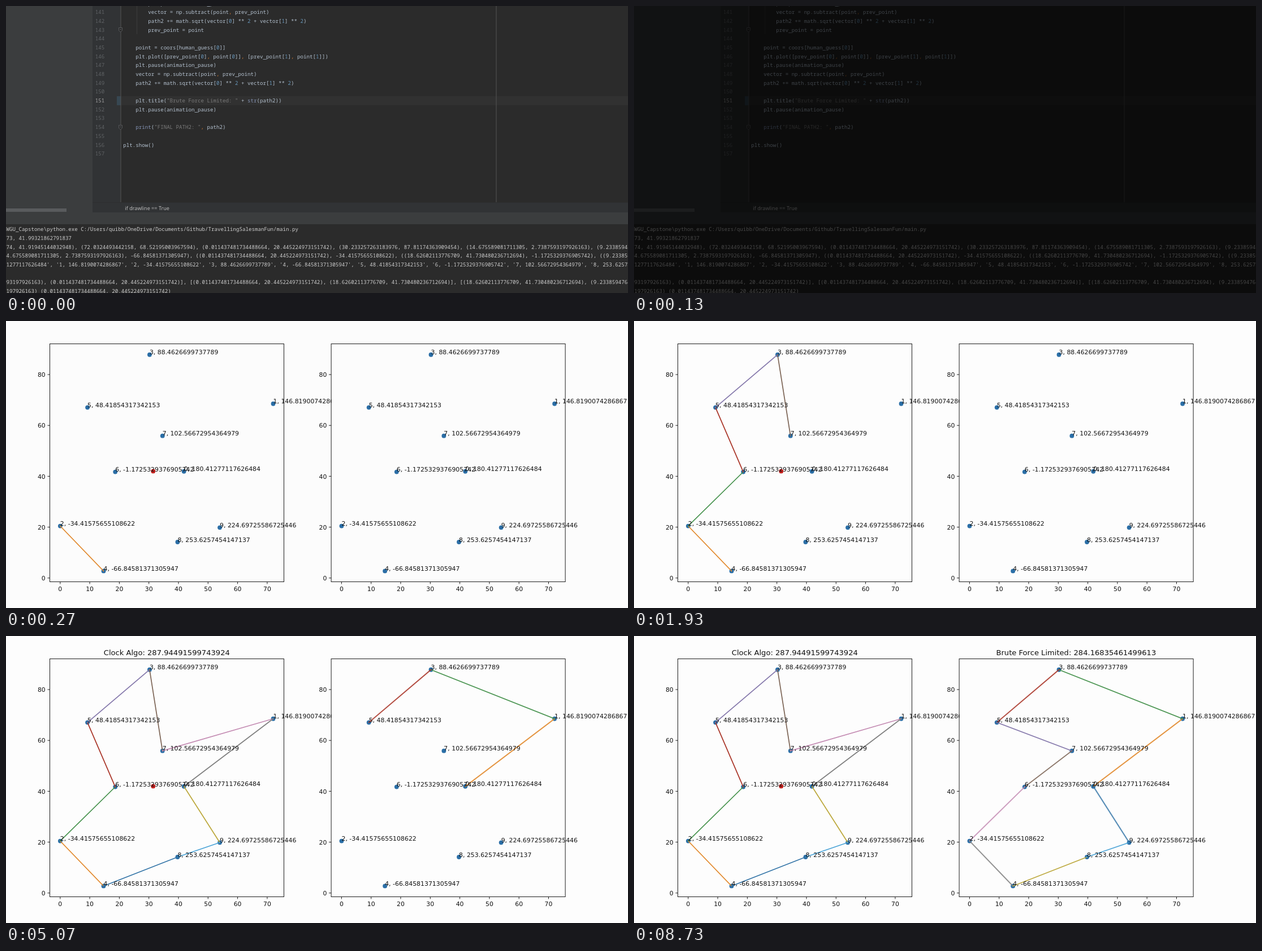
Recreate the animation shown at these times as an HTML page. Size 1100 by 509 pixels, loop 8790 ms.

```html
<!DOCTYPE html>
<html lang="en">
<head>
<meta charset="utf-8">
<title>Travelling salesman plots</title>
<style>
  html, body { margin: 0; width: 100%; height: 100%; overflow: hidden; background: #000; }
  svg { position: absolute; left: 0; top: 0; width: 1100px; height: 509px; overflow: hidden; }
  text { white-space: pre; }
  #editor text { font: 9.167px "Noto Sans Mono", "DejaVu Sans Mono", monospace; fill: #b3c0ce; }
  #editor .crumb { font: 9.1px "Open Sans", "Noto Sans", sans-serif; fill: #c4c4c4; }
  #editor .out { fill: #cdcdcd; }
  #editor .no { fill: #606366; }
  #editor .now { fill: #a4a3a3; }
  .num { fill: #6897bb; }
  .str { fill: #7a7a7a; }
  .fn { fill: #8493b4; }
  .sep { fill: #cc7832; }
  #plots text { font: 10.92px "DejaVu Sans", sans-serif; fill: #111; }
  #plots .title { font-size: 13.1px; }
  .mid { text-anchor: middle; }
  .end { text-anchor: end; }
</style>
</head>
<body>
<svg id="editor" viewBox="0 0 1100 509"></svg>
<svg id="plots" viewBox="0 0 1100 509"></svg>
<script>
const LOOP = 8790, STEP = 400;
const editor = document.getElementById('editor');
const plots = document.getElementById('plots');

// x, y and clock angle around the center; both screens are built from these
const center = [31.44573, 41.99321862791837];
const cities = [
  [41.852074, 41.91945144032948, 180.41277117626484],
  [72.0324493442158, 68.52195003967594, 146.8190074286867],
  [0.011437481734488664, 20.445224973151742, -34.41575655108622],
  [30.233257263183976, 87.81174363909454, 88.4626699737789],
  [14.675589081711305, 2.7387593197926163, -66.84581371305947],
  [9.233859476, 67.06, 48.41854317342153],
  [18.62602113776709, 41.730480236712694, -1.1725329376905742],
  [34.6, 55.9, 102.56672954364979],
  [39.7, 14.15, 253.6257454147137],
  [53.97, 19.85, 224.69725586725446]
].map(([x, y, angle], id) => ({ id, x, y, angle }));
const byAngle = [...cities].sort((a, b) => a.angle - b.angle);
const shortest = [...'0135762489'].map(id => cities[id]);

function add(parent, tag, attrs, content) {
  const el = document.createElementNS('http://www.w3.org/2000/svg', tag);
  for (const k in attrs) el.setAttribute(k, attrs[k]);
  if (content !== undefined) el.textContent = content;
  parent.appendChild(el);
  return el;
}
const rect = (p, x, y, width, height, fill) => add(p, 'rect', { x, y, width, height, fill });
const line = (p, x1, y1, x2, y2, stroke, w = 1) =>
  add(p, 'line', { x1, y1, x2, y2, stroke, 'stroke-width': w });
const label = (p, x, y, s, cls = '') => add(p, 'text', { x, y, class: cls }, s);

// rows: [time, style]; every value holds until the next row
function hold(el, rows) {
  const keys = rows.map(([t, style]) => ({ ...style, offset: t / LOOP, easing: 'step-end' }));
  keys.push({ ...rows[rows.length - 1][1], offset: 1 });
  el.animate(keys, { duration: LOOP, iterations: Infinity });
}
const showAt = (el, t) => hold(el, [[0, { opacity: 0 }], [t, { opacity: 1 }]]);

// ---- code editor ----
const PITCH = 15.69, CHAR = 5.5;
const code = `
        plt.pause(animation_pause)
        vector = np.subtract(point, prev_point)
        path2 += math.sqrt(vector[0] ** 2 + vector[1] ** 2)
        prev_point = point

    point = coors[human_guess[0]]
    plt.plot([prev_point[0], point[0]], [prev_point[1], point[1]])
    plt.pause(animation_pause)
    vector = np.subtract(point, prev_point)
    path2 += math.sqrt(vector[0] ** 2 + vector[1] ** 2)

    plt.title("Brute Force Limited: " + str(path2))
    plt.pause(animation_pause)

    print("FINAL PATH2: ", path2)

plt.show()
`.slice(1).split('\n');

const pair = c => `(${c.x}, ${c.y})`;
const legs = byAngle.slice(0, 3).map((c, i) => `[${pair(c)}, ${pair(byAngle[i + 1])}]`);

// console rows: characters scrolled off to the left, then the printed text
const output = [
  [0, 'WGU_Capstone\\python.exe C:/Users/quibb/OneDrive/Documents/Github/TravellingSalesmanFun/main.py'],
  [6, center.join(', ')],
  [8, cities.slice(0, 6).map(pair).join(', ')],
  [3, byAngle.slice(0, 4).map(c => `(${pair(c)}, ${c.angle})`).join(', ')],
  [9, cities.slice(0, 9).map(c => `'${c.id}, ${c.angle}'`).join(', ')],
  [0, ''],
  [29, legs.join(', ')],
  [30, byAngle.slice(0, 2).map(pair).join(' ')]
];

const token = /("[^"]*")|\b(str|print)\b|\b(\d+)\b|(,)/g;
const kinds = ['str', 'fn', 'num', 'sep'];

function highlight(x, y, src) {
  const el = label(editor, x, y, '');
  let at = 0;
  for (const m of src.matchAll(token)) {
    el.append(src.slice(at, m.index));
    const kind = kinds[m.slice(1).findIndex(Boolean)];
    add(el, 'tspan', { class: kind }, m[0]);
    at = m.index + m[0].length;
  }
  el.append(src.slice(at));
}

function drawEditor() {
  rect(editor, 0, 0, 1100, 509, '#2b2b2b');
  rect(editor, 0, 0, 153, 366, '#3b3d3e');
  rect(editor, 153, 0, 50, 348, '#313335');
  rect(editor, 203, 160, 897, 16, '#313131');
  rect(editor, 196, 160, 7, 16, '#374752');
  line(editor, 203, 0, 203, 348, '#555');
  line(editor, 231.5, 0, 231.5, 50, '#3d3d3d');
  line(editor, 867, 0, 867, 348, '#555');
  rect(editor, 153, 348.5, 947, 17.5, '#313335');
  rect(editor, 0, 366, 1100, 21, '#3b3d3e');
  rect(editor, 0, 359, 107, 6, '#595b5d');
  for (const y of [42, 215]) {
    add(editor, 'path', {
      d: `M199.5 ${y - 3.5}h6v5l-3 2.5l-3-2.5zM201 ${y - .5}h3`,
      fill: '#2b2b2b', stroke: '#606366', 'stroke-width': .8
    });
  }
  code.forEach((src, i) => {
    const y = 14.2 + (i - 1) * PITCH;
    label(editor, 157.8, y, 140 + i, i === 11 ? 'now' : 'no');
    const body = src.trimStart();
    highlight(207.2 + CHAR * (src.length - body.length), y, body);
  });
  label(editor, 210.5, 361.5, 'if drawline == True', 'crumb');
  output.forEach(([skip, s], i) => label(editor, .5, 399.3 + i * PITCH, s.slice(skip), 'out'));
}

// ---- the two plots ----
const colors = ['#e1882a', '#43904a', '#a93427', '#8275a9', '#7b6354',
                '#c48cb3', '#7f7f7f', '#bba73a', '#48a2d6', '#3173a6'];
const INK = '#1c1c1c';
const px = x => 95.8 + 5.23 * x;
const py = y => 455.8 - 4.51 * y;

function drawPlot(dx, tour, start, title, mark) {
  const g = add(plots, 'g', { transform: `translate(${dx} 0)` });
  rect(g, 77.5, 40.5, 414, 422, '#fdfdfd');
  const dot = (x, y, fill) => add(g, 'circle', { cx: px(x), cy: py(y), r: 3.9, fill });
  for (const c of cities) dot(c.x, c.y, '#2b6fa7');
  if (mark) dot(...mark, '#c5221f');

  tour.forEach((a, i) => {
    const b = tour[(i + 1) % tour.length];
    const leg = line(g, px(a.x), py(a.y), px(b.x), py(b.y), colors[i], 1.7);
    leg.setAttribute('stroke-linecap', 'square');
    showAt(leg, start + i * STEP);
  });

  rect(g, 77.5, 40.5, 414, 422, 'none').setAttribute('stroke', INK);
  for (let v = 0; v <= 70; v += 10) {
    line(g, px(v), 462.5, px(v), 466.5, INK);
    label(g, px(v), 479.3, v, 'mid');
  }
  for (let v = 0; v <= 80; v += 20) {
    line(g, 73.5, py(v), 77.5, py(v), INK);
    label(g, 69.8, py(v) + 4.1, v, 'end');
  }
  for (const c of cities) label(g, px(c.x), py(c.y) - .4, `${c.id}, ${c.angle}`);
  showAt(label(g, 284.3, 34.2, title, 'title mid'), start + tour.length * STEP);
}

const START = 130;
drawEditor();
rect(plots, 0, 0, 1100, 509, '#fdfdfd');
drawPlot(0, byAngle, START, 'Clock Algo: 287.94491599743924', center);
drawPlot(497.6, shortest, START + 10 * STEP, 'Brute Force Limited: 284.16835461499613');

// dip to black between the editor and the plots
hold(editor, [
  [0, { filter: 'brightness(1)' }],
  [70, { filter: 'brightness(.86)' }],
  [130, { filter: 'brightness(.35) contrast(1.03)' }]
]);
hold(plots, [
  [0, { opacity: 0, filter: 'brightness(1)' }],
  [200, { opacity: 1, filter: 'brightness(.34)' }],
  [270, { opacity: 1, filter: 'brightness(.995)' }],
  [330, { opacity: 1, filter: 'brightness(1)' }]
]);
</script>
</body>
</html>
```
